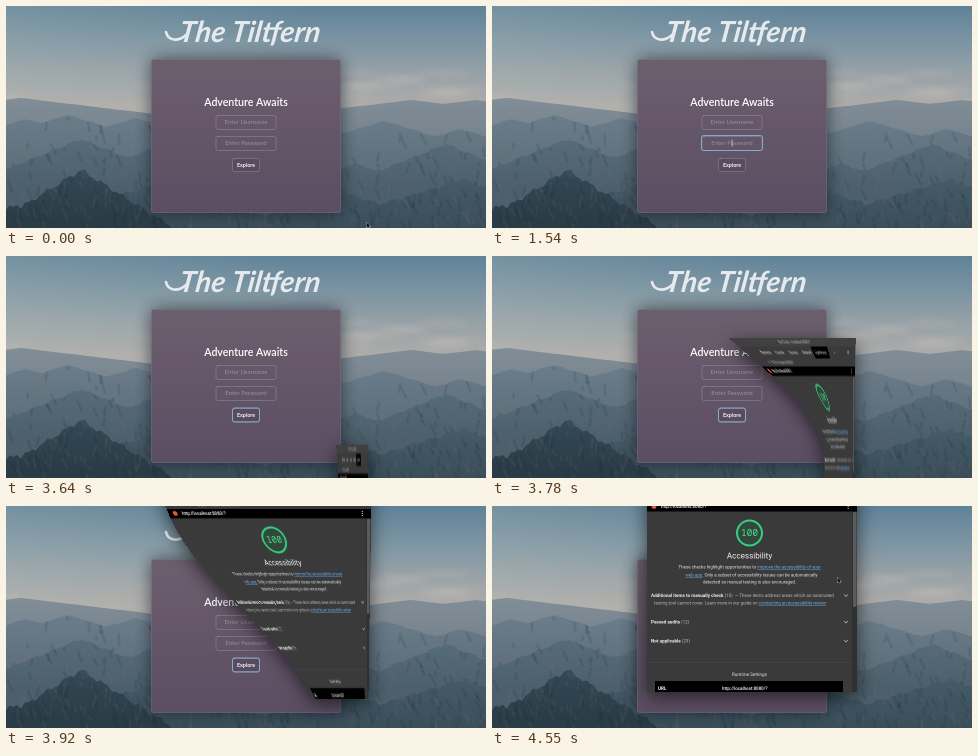
Recreate the animation shown at these times as an HTML page with a canvas. Size 480 by 222 pixels, loop 4760 ms.

```html
<!DOCTYPE html>
<html lang="en">
<head>
<meta charset="utf-8">
<title>Login and accessibility report</title>
<style>
  html, body { margin: 0; width: 100%; height: 100%; overflow: hidden; }
  canvas { display: block; width: 480px; height: 222px; }
</style>
</head>
<body>
<canvas id="stage" width="480" height="222"></canvas>
<script>
const W = 480, H = 222, LOOP = 4760, STEP = 70, SHARP = 2;
const WIN = { left: 155, right: 365, top: -33, bottom: 186, width: 210, height: 219 };
const DOCK = { left: 332, right: 362 };
const ctx = document.getElementById('stage').getContext('2d');
ctx.imageSmoothingQuality = 'high';

const clamp = v => Math.min(1, Math.max(0, v));
const mix = (a, b, k) => a + (b - a) * k;
const wave = u => (1 - Math.cos(Math.PI * clamp(u))) / 2;
const ramp = (t, start) => clamp((t - start + STEP) / (2 * STEP));

let seed = 7;
function random() {
  seed = (seed * 16807) % 2147483647;
  return seed / 2147483647;
}

function layer(scale, x, y, w, h, paint) {
  const canvas = document.createElement('canvas');
  canvas.width = w * scale;
  canvas.height = h * scale;
  const c = canvas.getContext('2d');
  c.scale(scale, scale);
  c.translate(-x, -y);
  paint(c);
  return canvas;
}

// Draws one line of text and returns where it ends
function text(c, str, x, y, font, color, align = 'left') {
  c.font = font;
  c.fillStyle = color;
  c.textAlign = align;
  c.textBaseline = 'middle';
  c.fillText(str, x, y);
  return x + c.measureText(str).width;
}

function box(c, x, y, w, h, r, fill, stroke) {
  c.beginPath();
  c.roundRect(x, y, w, h, r);
  if (fill) { c.fillStyle = fill; c.fill(); }
  if (stroke) { c.strokeStyle = stroke; c.lineWidth = 1; c.stroke(); }
}

function disc(c, x, y, r, fill) {
  c.beginPath();
  c.arc(x, y, r, 0, 7);
  c.fillStyle = fill;
  c.fill();
}

function fade(c, x0, y0, x1, y1, ...colors) {
  const g = c.createLinearGradient(x0, y0, x1, y1);
  colors.forEach((color, i) => g.addColorStop(i / (colors.length - 1), color));
  return g;
}

// A range is the upper outline of cones standing at a few peaks, roughened by sines
function mountains(c, depth, slope, peaks) {
  const outline = x => Math.min(...peaks.map(([px, py]) => py + slope * Math.abs(x - px)))
    + Math.sin(x * .33 + depth) * .4 * depth + Math.sin(x * .83 + depth * 2) * .25 * depth;
  const tone = light => `hsl(${206 - depth} ${9 + 4 * depth}% ${light - 7 * depth}%)`;
  const crest = Math.min(...peaks.map(p => p[1]));

  c.save();
  c.beginPath();
  c.moveTo(0, H);
  for (let x = 0; x <= W; x += 2) c.lineTo(x, outline(x));
  c.lineTo(W, H);
  c.fillStyle = fade(c, 0, crest, 0, crest + 50, tone(55), tone(50));
  c.fill();
  c.clip();
  c.lineWidth = 2.5;
  for (let i = 0; i < 90 * depth; i++) {
    const x = random() * W, y = outline(x) + random() ** 2 * 60, reach = 4 + random() * 9;
    c.strokeStyle = random() < .45 ? 'rgba(132,108,104,.13)' : 'rgba(22,42,58,.13)';
    c.beginPath();
    c.moveTo(x, y);
    c.lineTo(x + reach * (random() - .3), y + reach);
    c.stroke();
  }
  c.restore();
}

function paintLandscape(c) {
  c.fillStyle = fade(c, 0, 0, 0, 100, '#5f8298', '#7a93a2', '#96a1a7', '#aeaca9');
  c.fillRect(0, 0, W, H);
  c.fillStyle = fade(c, 0, 0, 300, 0, 'rgba(200,205,195,.2)', 'rgba(200,205,195,0)');
  c.fillRect(0, 0, W, H);

  c.save();
  c.filter = 'blur(3px)';
  c.fillStyle = 'rgba(205,200,192,.3)';
  for (let i = 0; i < 16; i++) {
    c.beginPath();
    c.ellipse(random() * W, 66 + random() * 26, 18 + random() * 24, 1.5 + random() * 2, 0, 0, 7);
    c.fill();
  }
  c.restore();

  mountains(c, 0, .12, [[15, 92], [60, 98], [405, 94], [470, 94]]);
  mountains(c, 1, .3, [[20, 113], [62, 109], [130, 112], [378, 115], [455, 123]]);
  mountains(c, 2, .4, [[75, 133], [150, 141], [350, 157], [440, 138]]);
  mountains(c, 3, .3, [[150, 178], [335, 186], [455, 174]]);
  mountains(c, 4, .62, [[75, 164], [10, 198]]);
}

function paintForm(c) {
  c.save();
  c.shadowColor = 'rgba(10,18,28,.65)';
  c.shadowBlur = 18;
  box(c, 145.5, 53.5, 189, 153, 2, '#65576a');
  c.restore();
  box(c, 145.5, 53.5, 189, 153, 2, fade(c, 0, 54, 0, 207, '#6c5f6d', '#645669', '#5b4e62'), 'rgba(150,145,158,.25)');

  c.save();
  c.transform(1, 0, -.14, 1, 4, 0);
  text(c, 'The Tiltfern', 244, 27, 'italic bold 29px Lato, sans-serif', '#e6eaed', 'center');
  c.restore();
  c.strokeStyle = '#e6eaed';
  c.lineWidth = 2.6;
  c.lineCap = 'round';
  c.stroke(new Path2D('M160 26C162 35 172 36 180 29'));

  text(c, 'Adventure Awaits', 240, 97, '600 10.6px Lato, sans-serif', '#fff', 'center');
  const line = 'rgba(185,178,190,.3)', hint = '#9a8f9d';
  for (const [label, y] of [['Enter Username', 116.5], ['Enter Password', 137.5]]) {
    box(c, 210, y - 7, 60, 14, 2, null, line);
    text(c, label, 240, y, '6.1px Lato, sans-serif', hint, 'center');
  }
  box(c, 226.5, 152.5, 27, 13, 2, 'rgba(80,66,84,.4)', line);
  text(c, 'Explore', 240, 159, 'bold 5.4px Lato, sans-serif', '#f4f2f5', 'center');
}

function paintReport(c) {
  const face = 'Roboto, sans-serif', url = 'http://localhost:8080/?';
  const body = '4.45px ' + face, bold = 'bold 4.6px ' + face, medium = '500 4.45px ' + face;
  const soft = '#bdbdbd', pale = '#e6e6e6';
  const bar = (y, h, color, x = WIN.left, w = WIN.width) => {
    c.fillStyle = color;
    c.fillRect(x, y, w, h);
  };
  const link = (str, x, y) => {
    const end = text(c, str, x, y, body, '#6fb1f5');
    bar(y + 2.2, .4, '#6fb1f5', x, end - x);
    return end;
  };

  bar(WIN.top, WIN.height, '#3a3a3a');
  bar(WIN.top, 9, '#404040');
  text(c, 'DevTools - localhost:8080/?', 260, -28.5, body, soft, 'center');
  bar(-24, 12, '#000', 284, 30);
  'Elements Console Sources Network Lighthouse » ⚙'.split(' ')
    .forEach((label, i) => text(c, label, 194 + 26.2 * i, -18, body, pale, 'center'));
  text(c, '+   10:55 - localhost:8080/?', 180, -8, body, soft);

  bar(-4, 9.5, '#000');
  disc(c, 162, .5, 2.4, '#e4572e');
  text(c, url, 169, .5, medium, '#fff');
  text(c, '⋮', 356, .5, 'bold 6px ' + face, '#fff', 'center');

  disc(c, 257.5, 27, 13.5, '#35d07f');
  disc(c, 257.5, 27, 11.5, '#33483d');
  text(c, '100', 257.5, 27.3, '9.5px "Noto Sans Mono", monospace', '#4be08f', 'center');
  text(c, 'Accessibility', 257.5, 50, '8.1px ' + face, '#f0f0f0', 'center');

  const intro = text(c, 'These checks highlight opportunities to ', 186.5, 61, body, pale);
  link('improve the accessibility of your', intro, 61);
  const app = link('web app', 193.5, 69);
  text(c, '. Only a subset of accessibility issues can be automatically', app, 69, body, pale);
  text(c, 'detected so manual testing is also encouraged.', 257.5, 76, body, pale, 'center');

  const sections = [
    ['Additional items to manually check', ' (10)  — These items address areas which an automated', 89.5],
    ['Passed audits', ' (12)', 116],
    ['Not applicable', ' (29)', 135],
  ];
  for (const [title, note, y] of sections) {
    text(c, note, text(c, title, 159, y, bold, '#f0f0f0'), y, body, soft);
    c.strokeStyle = soft;
    c.lineWidth = .7;
    c.stroke(new Path2D(`M352 ${y - 1}l2 2l2 -2`));
  }
  const guide = text(c, 'testing tool cannot cover. Learn more in our guide on ', 162, 97, body, soft);
  link('conducting an accessibility review', guide, 97);

  bar(156, .5, '#4a4a4a');
  text(c, 'Runtime Settings', 257.5, 168.5, '4.6px ' + face, pale, 'center');
  bar(175, 11, '#000', 163, 188);
  text(c, 'URL', 166, 182.5, bold, '#fff');
  text(c, url, 230, 182.5, medium, '#fff');

  bar(5.5, 181, '#303030', 360, 5);
  box(c, 361, 6, 3.5, 95, 1.5, '#5c5c5c');
}

const scene = layer(1, 0, 0, W, H, c => { paintLandscape(c); paintForm(c); });
const report = layer(SHARP, WIN.left, WIN.top, WIN.width, WIN.height, paintReport);

function focusRing(y, w, h, level, caret) {
  ctx.globalAlpha = clamp(level) * .9;
  box(ctx, 240 - w / 2, y - h / 2, w, h, 2, null, '#86b4dc');
  if (caret) {
    ctx.fillStyle = '#d8d4da';
    ctx.fillRect(239.7, y - 3.5, .8, 7);
  }
  ctx.globalAlpha = 1;
}

function pointer(x, y) {
  const arrow = new Path2D(`M${x} ${y}v5l1.3 -1l1 1.5l.8 -.4l-.8 -1.5h1.5z`);
  ctx.strokeStyle = 'rgba(235,235,235,.8)';
  ctx.lineWidth = .8;
  ctx.stroke(arrow);
  ctx.fillStyle = '#111';
  ctx.fill(arrow);
}

// The report rises out of the dock through a funnel, which then straightens
function drawReport(t) {
  if (t < 3640) return;
  const drop = 229 * (1 - wave((t - 3600) / 360));
  const bend = 1 - wave((t - 3886) / 200);
  const reach = mix(235, 270, clamp((t - 3780) / 140));
  const pinch = y => bend * wave((y + 30) / reach);
  const left = y => mix(WIN.left, DOCK.left, pinch(y));
  const right = y => mix(WIN.right, DOCK.right, pinch(y));
  const top = Math.round(WIN.top + drop), bottom = Math.round(WIN.bottom + drop);

  ctx.save();
  ctx.shadowColor = 'rgba(0,0,0,.6)';
  ctx.shadowBlur = 18;
  ctx.shadowOffsetY = 5;
  ctx.fillStyle = '#3a3a3a';
  ctx.beginPath();
  for (let y = top; y <= bottom; y++) ctx.lineTo(left(y), y);
  for (let y = bottom; y >= top; y--) ctx.lineTo(right(y), y);
  ctx.fill();
  ctx.restore();

  for (let y = Math.max(0, top); y < Math.min(H, bottom); y++) {
    const row = Math.min(WIN.height - 1, Math.max(0, y - drop - WIN.top));
    const x = left(y);
    ctx.drawImage(report, 0, row * SHARP, report.width, SHARP, x, y, right(y) - x, 1);
  }
}

function draw(t) {
  ctx.drawImage(scene, 0, 0);
  const username = ramp(t, 700), password = ramp(t, 1190), explore = ramp(t, 1750);
  focusRing(116.5, 61, 15, username - password, true);
  focusRing(137, 61, 15, password - explore, true);
  focusRing(159, 27, 14, explore);
  drawReport(t);
  if (t < 1190) pointer(360.5, 216.5);
  if (t >= 4200) {
    const k = wave((t - 4130) / 420);
    pointer(mix(371, 345.5, k), mix(208, 71.5, k));
  }
}

const start = performance.now();
function tick() {
  const t = (performance.now() - start) % LOOP;
  draw(Math.floor(t / STEP) * STEP);
  requestAnimationFrame(tick);
}
tick();
</script>
</body>
</html>
```
